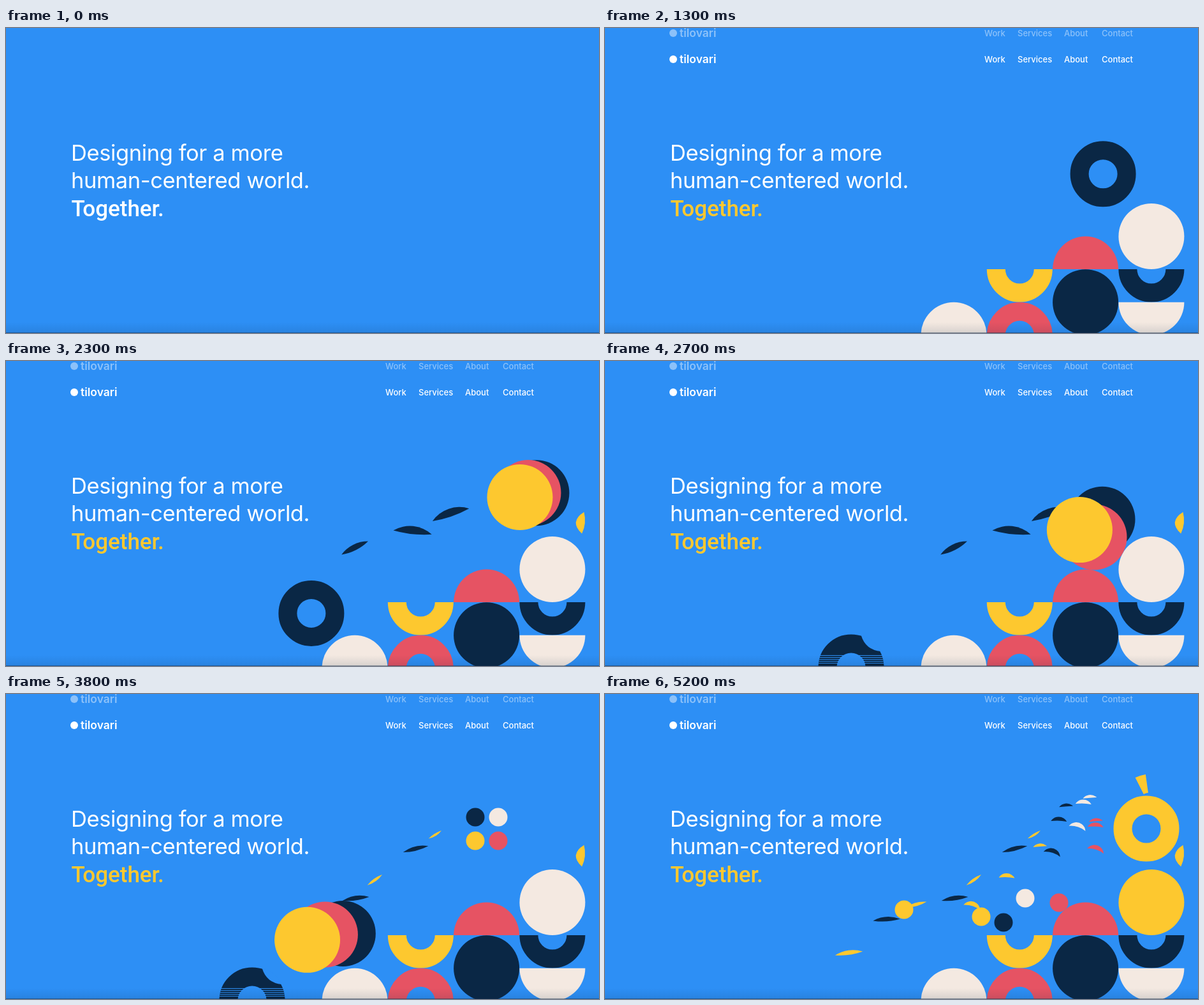
Animation, 930 px wide and 478 px high, one loop 5300 ms. Source, as an HTML page with a canvas:

```html
<!DOCTYPE html>
<html lang="en">
<head>
<meta charset="utf-8">
<title>Studio landing page</title>
<style>
  html, body { margin: 0; width: 100%; height: 100%; overflow: hidden; background: #2d8ff5; }
  canvas, svg { position: absolute; left: 0; top: 0; width: 930px; height: 478px; }
  text { fill: #fff; font-family: Inter, sans-serif; }
  .headline { font-size: 34.5px; font-weight: 400; letter-spacing: -0.4px; }
  .accent { font: 500 35px Roboto, sans-serif; }
  .brand { font-size: 17.5px; font-weight: 600; }
  .link { font-size: 13px; font-weight: 500; }
</style>
</head>
<body>
<canvas id="stage" width="930" height="478"></canvas>
<svg viewBox="0 0 930 478">
  <defs>
    <g id="header">
      <circle cx="107" cy="49" r="6" fill="#fff"/>
      <text class="brand" x="117" y="55">tilovari</text>
      <text class="link" x="595" y="54">Work</text>
      <text class="link" x="647" y="54">Services</text>
      <text class="link" x="720" y="54">About</text>
      <text class="link" x="779" y="54">Contact</text>
    </g>
  </defs>
  <use id="ghost" href="#header" y="-41" opacity="0"/>
  <use id="nav" href="#header" opacity="0"/>
  <text class="headline" x="102" y="208">Designing for a more</text>
  <text class="headline" x="102" y="251">human-centered world.</text>
  <text class="accent" id="accent" x="102.5" y="294.5">Together.</text>
</svg>
<script>
const LOOP = 5300, STEP = 100, GRAVITY = 0.0007;
const R = 51.5, HOLE = 22.5, DOT = 14.5;
const BLUE = '#2d8ff5', DARK = '#0a2745', RED = '#e65363', YELLOW = '#fdc82f', CREAM = '#f4e9e1';
const byId = id => document.getElementById(id);
const ctx = byId('stage').getContext('2d');
const nav = byId('nav'), ghost = byId('ghost'), accent = byId('accent');
const rad = deg => deg * Math.PI / 180;
const ramp = (t, from, to) => Math.min(1, Math.max(0, (t - from) / (to - from)));
const random = seed => {
  const n = Math.abs(Math.sin(seed * 12.9898) * 43758.5453);
  return n - Math.floor(n);
};
const col = i => 547 + 103.3 * i;
const row = j => 326.5 + 51.6 * j;

// Each path lists bounce points as [time, x, y]; gravity shapes the hops between.
const ringPath = [[600, 855, 177], [870, 848, 222], [1500, 750, 276], [1870, 606, 327],
  [2330, 470, 405], [2600, 386, 480], [2750, 350, 560]];
const ballPath = [[1700, 855, 177], [1930, 854, 223], [2600, 767, 276], [3250, 620, 327],
  [3540, 545, 378], [4150, 375, 470], [4300, 345, 560]];
const dots = [
  { color: DARK, path: [[3800, 736, 193], [4600, 687, 333], [5200, 625, 358]] },
  { color: CREAM, path: [[3800, 772, 193], [4600, 728, 279], [5200, 659, 320]] },
  { color: YELLOW, path: [[3800, 736, 230], [4350, 590, 349], [4600, 509, 318], [5200, 469, 338]] },
  { color: RED, path: [[3800, 772, 230], [4600, 766, 314], [5200, 712, 327]] }
];

function hop(path, t) {
  const next = path.findIndex(key => key[0] > t);
  if (next === 0) return path[0].slice(1);
  if (next < 0) return path[path.length - 1].slice(1);
  const [t0, x0, y0] = path[next - 1], [t1, x1, y1] = path[next];
  const p = ramp(t, t0, t1);
  const lift = GRAVITY / 2 * (t - t0) * (t1 - t);
  return [x0 + (x1 - x0) * p, y0 + (y1 - y0) * p - lift];
}

function disc(color, x, y, r = R, from = 0, to = 360) {
  ctx.fillStyle = color;
  ctx.beginPath();
  ctx.arc(x, y, r, rad(from), rad(to));
  ctx.fill();
}

function ring(color, x, y, from = 0, to = 360) {
  ctx.strokeStyle = color;
  ctx.lineWidth = R - HOLE;
  ctx.beginPath();
  ctx.arc(x, y, (R + HOLE) / 2, rad(from), rad(to));
  ctx.stroke();
}

function sliver(color, x, y, r, from, span, depth) {
  const mid = rad(from + span / 2), a = rad(from);
  const reach = 2 * (r - depth) - r * Math.cos(rad(span / 2));
  ctx.fillStyle = color;
  ctx.beginPath();
  ctx.arc(x, y, r, a, rad(from + span));
  ctx.quadraticCurveTo(x + reach * Math.cos(mid), y + reach * Math.sin(mid),
    x + r * Math.cos(a), y + r * Math.sin(a));
  ctx.fill();
}

// Slivers of a moving disc stay behind along its path.
function trail(t, { path, colors, r = R, from, to, every, life = LOOP, span, depth }) {
  for (let s = from, i = 0; s <= to; s += every, i++) {
    if (t < s + 200 || t > s + life) continue;
    const turn = -150 + 35 * random(s);
    const size = 0.6 + 0.6 * random(s + 1);
    sliver(colors[i % colors.length], ...hop(path, s), r, turn, span * size, depth * size);
  }
}

function trails(t) {
  trail(t, { path: ringPath, colors: [DARK], from: 1600, to: 2000, every: 200, life: 1200, span: 75, depth: 13 });
  trail(t, { path: ballPath, colors: [YELLOW, DARK], from: 2900, to: 4100, every: 200, span: 42, depth: 6 });
  if (t > 1800) sliver(YELLOW, 857, 249, 51, -14, 39, 14);
}

function dotTrails(t) {
  for (const { color, path } of dots)
    trail(t, { path, colors: [color], r: DOT, from: 4000, to: 4400, every: 200, span: 120, depth: 6 });
}

function fadedRing(t) {
  if (t < 2600 || t > 4300) return;
  ring(DARK, 386, 480, 180, 360);
  sliver(BLUE, 386, 480, 53, -73, 45, 11);
  ctx.fillStyle = BLUE;
  for (let y = 461; y < 476; y += 3) ctx.fillRect(334, y, 105, 1);
}

function blocks(t, opacity) {
  const yellow = Math.max(1 - ramp(t, 900, 1200), ramp(t, 4700, 5100));
  disc(yellow === 1 ? YELLOW : CREAM, col(3), row(0));
  if (yellow > 0 && yellow < 1) {
    ctx.globalAlpha = opacity * yellow;
    disc(YELLOW, col(3), row(0));
    ctx.globalAlpha = opacity;
  }
  disc(RED, col(2), row(1), R, 180, 360);
  ring(YELLOW, col(1), row(1), 0, 180);
  disc(DARK, col(2), row(2));
  ring(DARK, col(3), row(1), 0, 180);
  disc(CREAM, col(3), row(2), R, 0, 180);
  disc(CREAM, col(0), row(3));
  ring(RED, col(1), row(3));
}

function balls(t) {
  if (t > 4500) return;
  const size = R * ramp(t, 1400, 1700);
  [DARK, RED, YELLOW].forEach((color, i) => disc(color, ...hop(ballPath, t - 200 + i * 100), size));
}

function smallDots(t) {
  if (t > 4400) disc(YELLOW, 590, 349, DOT);
  const size = DOT * ramp(t, 3300, 3700);
  for (const { color, path } of dots) disc(color, ...hop(path, t), size);
}

function yellowRing(t) {
  const drop = ramp(t, 4900, 5200) ** 2;
  const sweep = 360 * ramp(t, 4100, 4645);
  if (t > 4900) ring(YELLOW, 855, 177, -117, -98);
  if (sweep > 0) ring(YELLOW, 855 - 6 * drop, 177 + 34 * drop, -90, sweep - 90);
}

function bottomShade() {
  const shade = ctx.createLinearGradient(0, 461, 0, 478);
  shade.addColorStop(0, 'rgba(10,39,69,0)');
  shade.addColorStop(1, 'rgba(10,39,69,0.12)');
  ctx.fillStyle = shade;
  ctx.fillRect(0, 461, 930, 17);
  ctx.fillStyle = 'rgba(10,39,69,0.45)';
  ctx.fillRect(0, 477, 930, 1);
}

function header(t) {
  const enter = ramp(t, 200, 650);
  nav.setAttribute('opacity', enter);
  nav.setAttribute('y', -75 * (1 - enter));
  ghost.setAttribute('opacity', t > 400 ? 0.45 : 0);
  const tint = ramp(t, 900, 1300);
  accent.style.fill = `rgb(${255 - 2 * tint},${255 - 55 * tint},${255 - 208 * tint})`;
}

function draw(t) {
  const opacity = ramp(t, 400, 1100);
  ctx.fillStyle = BLUE;
  ctx.fillRect(0, 0, 930, 478);
  ctx.globalAlpha = opacity;
  blocks(t, opacity);
  trails(t);
  fadedRing(t);
  if (t < 2700) ring(DARK, ...hop(ringPath, t));
  balls(t);
  dotTrails(t);
  smallDots(t);
  yellowRing(t);
  ctx.globalAlpha = 1;
  bottomShade();
  header(t);
}

const start = performance.now();
function tick() {
  const t = (performance.now() - start) % LOOP;
  draw(Math.floor(t / STEP) * STEP);
  requestAnimationFrame(tick);
}
tick();
</script>
</body>
</html>
```
